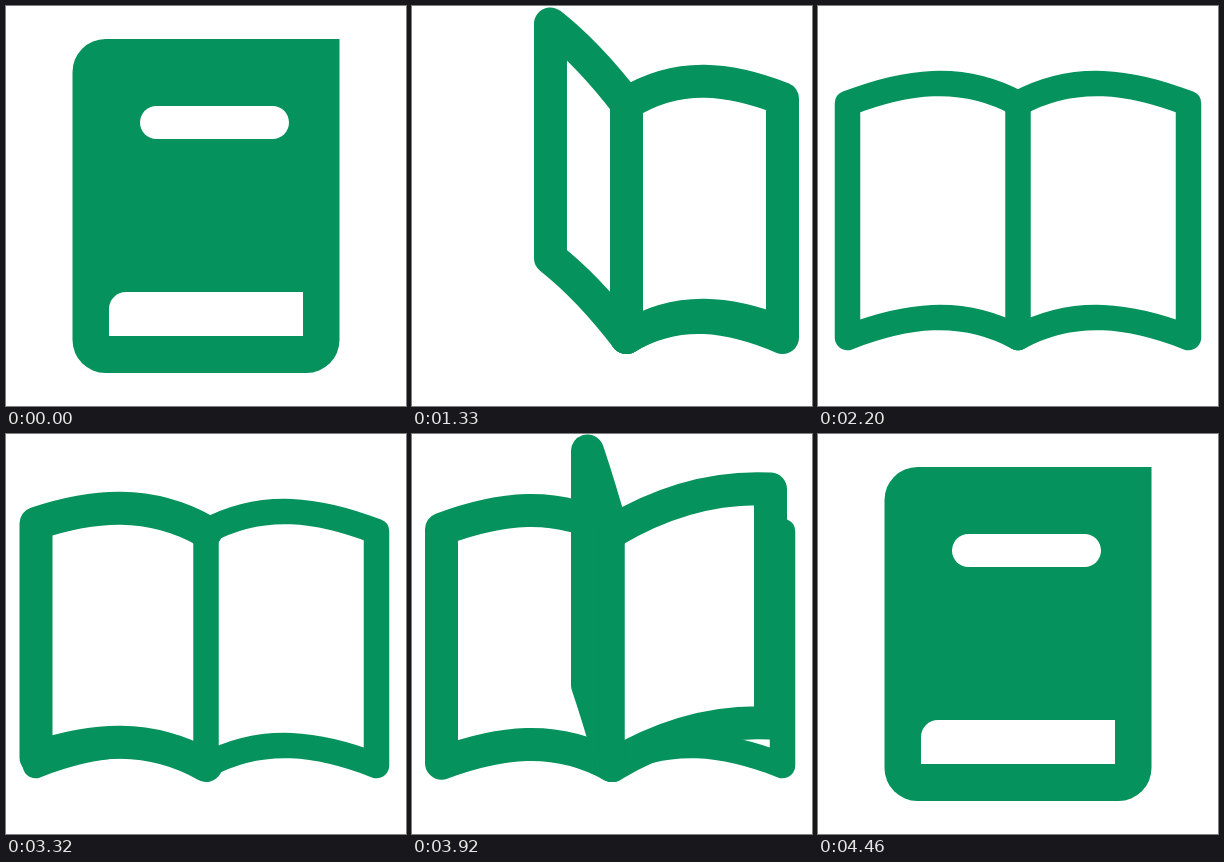
Recreate the animation shown at these times as an HTML page with a canvas. Size 400x400 px, loop 4.52 s.

```html
<!DOCTYPE html>
<html lang="en">
<head>
<meta charset="utf-8">
<title>Book opening and closing</title>
<style>
html, body { margin: 0; width: 100%; height: 100%; overflow: hidden; background: #fff; }
canvas { display: block; width: 100vmin; height: 100vmin; }
</style>
</head>
<body>
<canvas id="stage" width="400" height="400"></canvas>
<script>
const ctx = document.getElementById('stage').getContext('2d');
const GREEN = '#05925c', WHITE = '#fff';
const LOOP = 4520, STEP = 30;
const OPEN_START = 1030, OPEN_END = 2200, CLOSE_START = 3320, CLOSE_END = 4460;
const MID = 200, REACH = 170.5, THICK = 33, THIN = 25.5;
const TURN = 530, COVER_START = 1010, COVER_TURN = 571;
const PAGE_STARTS = [1310, 1490, 1670];

// Path of a leaf's free edge: time, offset from the spine, lift
const ARC = [
  [0, 170.5, 0], [30, 170, 9], [80, 158.5, 42.5], [170, 42, 73.5],
  [260, -24.5, 80.5], [297, -61.5, 79.5], [350, -106.5, 64.5],
  [410, -143, 54], [500, -170, 8], [530, -170.5, 0]
];

const mix = (a, b, k) => a + (b - a) * k;
const clamp = k => Math.min(1, Math.max(0, k));
const span = (t, from, to) => clamp((t - from) / (to - from));
const smooth = k => k * k * (3 - 2 * k);

function slope(i, c) {
  const a = ARC[Math.max(0, i - 1)], b = ARC[Math.min(ARC.length - 1, i + 1)];
  return (b[c] - a[c]) / (b[0] - a[0]);
}

function arcAt(t) {
  let i = 0;
  while (i < ARC.length - 2 && t > ARC[i + 1][0]) i++;
  const a = ARC[i], b = ARC[i + 1], d = b[0] - a[0], k = clamp((t - a[0]) / d);
  const [x, lift] = [1, 2].map(c =>
    mix(a[c], b[c], smooth(k)) +
    d * k * (1 - k) * ((1 - k) * slope(i, c) - k * slope(i + 1, c)));
  return { x: Math.max(-REACH, Math.min(REACH, x)), lift };
}

// A sheet runs from its spine corner along the top, down the edge and back
function sheetPath(s) {
  const dx = s.ex - s.sx, dy = s.ey - s.sy, low = s.sy + s.h;
  const nearX = s.sx + dx / 3, farX = s.sx + dx * 2 / 3;
  const nearY = dy / 3 - s.near, farY = dy * 2 / 3 - s.far;
  ctx.beginPath();
  ctx.moveTo(s.sx, s.sy);
  ctx.bezierCurveTo(nearX, s.sy + nearY, farX, s.sy + farY, s.ex, s.ey);
  ctx.lineTo(s.ex, s.ey + s.h);
  ctx.bezierCurveTo(farX, low + farY, nearX, low + nearY, s.sx, low);
}

function drawSheet(s, width, { fill = WHITE, closed = false } = {}) {
  sheetPath(s);
  if (closed) ctx.closePath();
  ctx.fillStyle = fill;
  ctx.fill();
  ctx.lineWidth = width;
  ctx.stroke();
}

function line(x1, y1, x2, y2, width) {
  ctx.beginPath();
  ctx.moveTo(x1, y1);
  ctx.lineTo(x2, y2);
  ctx.lineWidth = width;
  ctx.stroke();
}

function box(x, y, w, h, radii, color) {
  ctx.beginPath();
  ctx.roundRect(x, y, w, h, radii);
  ctx.fillStyle = color;
  ctx.fill();
}

function drawClosed() {
  box(66.5, 33, 267, 334, [33, 0, 33, 33], GREEN);
  box(134, 100, 149, 33, 16.5, WHITE);
  box(103, 286, 194, 44, [17, 0, 0, 0], WHITE);
}

function turningSheet(t, sx, sy) {
  const { x, lift } = arcAt(t);
  const c = Math.abs(x) / REACH, settle = c ** 40;
  return {
    x, sx, sy, ex: MID + x, ey: sy - lift, h: 234,
    near: 18 * c + 13 * settle, far: 18 * c + 4 * settle
  };
}

function drawCover(t, spine, top, m) {
  const age = (t - COVER_START) * TURN / COVER_TURN;
  const s = turningSheet(age, spine, top);
  s.ex = mix(317.5, s.ex, m);
  s.ey = top - (top - s.ey) * Math.sqrt(m);
  s.h = mix(220, s.h, m);
  s.near *= m;
  s.far *= m;
  const front = t < 1150;
  drawSheet(s, THICK, { fill: front ? GREEN : WHITE, closed: true });
  if (!front) return;
  const at = k => [mix(s.sx, s.ex, k), mix(s.sy, s.ey, k) + 67 - 16 * m];
  ctx.strokeStyle = WHITE;
  line(...at(0.287), ...at(0.782), THICK * (1 - m / 2));
  ctx.strokeStyle = GREEN;
}

function drawMoving(t) {
  const m = smooth(span(t, COVER_START, COVER_START + 240));
  const settle = span(t, 1330, 1510);
  const spine = mix(mix(83, 214.5, m), MID, smooth(settle));
  const top = mix(49.5, 97.5, m), bottom = mix(350.5, 331.5, m);
  const width = mix(THICK, THIN, settle);
  const rest = { sx: spine, sy: top, ey: top, h: bottom - top, near: 31 * m, far: 22 * m };

  drawSheet({ ...rest, ex: mix(317.5, MID + REACH, m) }, width);
  if (t < COVER_START + COVER_TURN) drawCover(t, spine, top, m);
  else drawSheet({ ...rest, ex: MID - REACH }, width);

  PAGE_STARTS
    .filter(start => t > start && t < start + TURN)
    .map(start => turningSheet(t - start, spine, top))
    .sort((a, b) => Math.abs(b.x) - Math.abs(a.x))
    .forEach(s => drawSheet(s, THICK));

  line(spine, top, spine, bottom, width);
}

function draw(t) {
  ctx.fillStyle = WHITE;
  ctx.fillRect(0, 0, 400, 400);
  ctx.strokeStyle = GREEN;
  ctx.lineCap = ctx.lineJoin = 'round';
  const snap = from => from + Math.floor((t - from) / STEP) * STEP;
  if (t < OPEN_START || t >= CLOSE_END) drawClosed();
  else if (t < OPEN_END) drawMoving(snap(OPEN_START));
  else if (t < CLOSE_START) drawMoving(OPEN_END);
  else drawMoving(OPEN_START + CLOSE_END - snap(CLOSE_START));
}

function frame() {
  draw(performance.now() % LOOP);
  requestAnimationFrame(frame);
}
frame();
</script>
</body>
</html>
```
